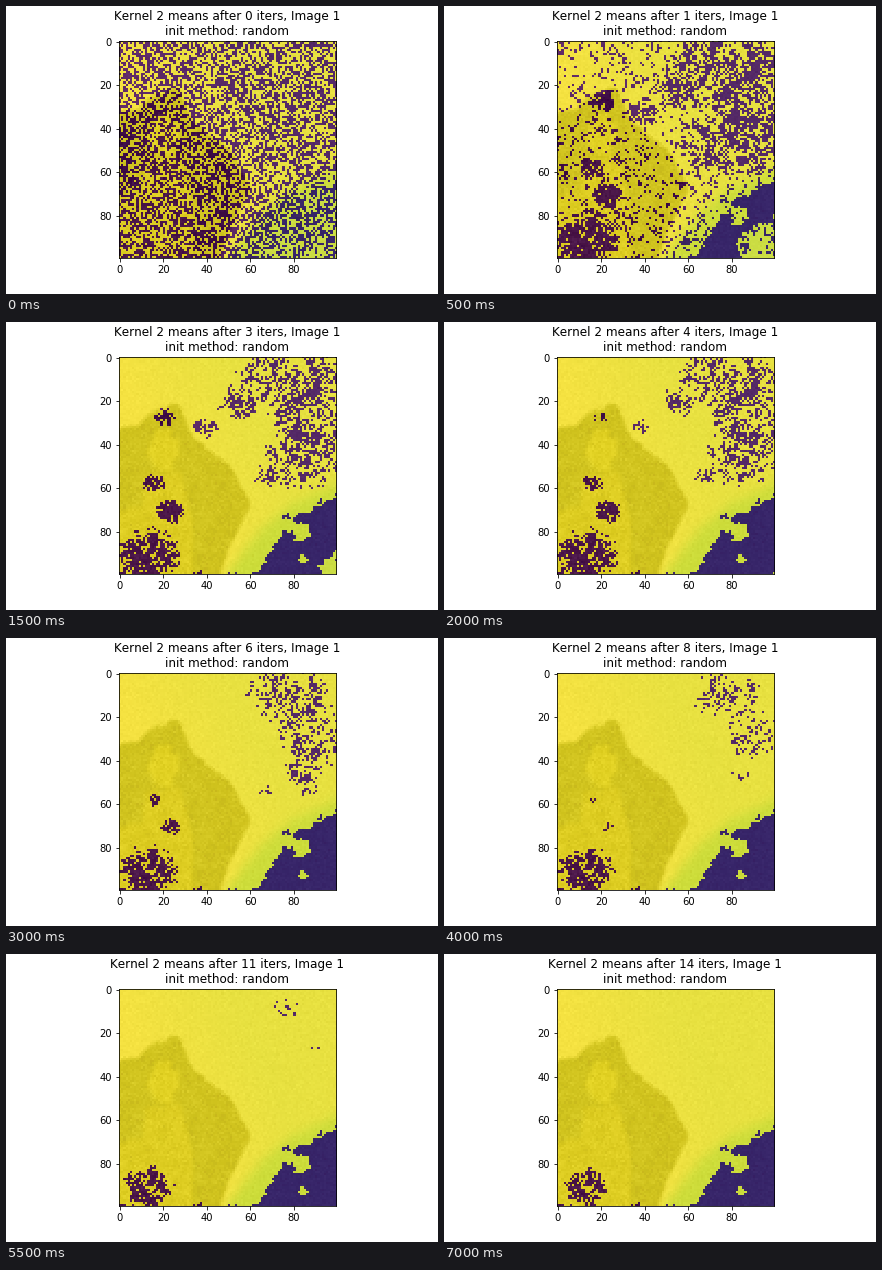
Recreate the animation shown at these times as a matplotlib script. Size 432 by 288 pixels, loop 7500 ms.

```python
import numpy as np
import matplotlib.pyplot as plt
from matplotlib.animation import FuncAnimation

N, ITERS = 100, 15
rng = np.random.default_rng(7)
yy, xx = np.mgrid[0:N, 0:N].astype(float)

# x, y, radius, iteration at which the purple patch is gone
PATCHES = [(77, 9, 26, 11.8), (91, 28, 24, 11.8), (84, 46, 20, 8.5), (55, 20, 13, 6),
           (67, 54, 8, 7), (39, 32, 8, 5), (20, 28, 7, 5), (16, 58, 6, 9),
           (23, 71, 8, 9), (13, 91, 16, 26)]


def blur(a, times):
    for _ in range(times):
        p = np.pad(a, 1, mode="edge")
        a = (p[:-2, 1:-1] + p[2:, 1:-1] + p[1:-1, :-2] + p[1:-1, 2:] + p[1:-1, 1:-1]) / 5
    return a


def noise(smooth=0):
    a = blur(rng.normal(0, 1, (N, N)), smooth)
    return a / a.std()


def below(xs, ys, rough=0.6):
    """Everything under a coast line through the given points."""
    return (yy + rough * noise(1) > np.interp(xx, xs, ys)).astype(float)


def disc(x, y, rx, ry):
    return (np.hypot((xx - x) / rx, (yy - y) / ry) + .1 * noise(1) < 1).astype(float)


def paint(img, mask, color):
    m = mask[..., None]
    return img * (1 - m) + np.array(color) * m


def make_photo():
    east = np.clip((xx - .45 * yy + 5) / 55, 0, 1)
    img = paint(np.full((N, N, 3), (214, 207, 180.)), east, (150, 203, 178))
    img = paint(img, blur(shallows, 14), (15, 178, 145))
    img = paint(img, .9 * blur(sea, 1), (5, 182, 195))
    img = paint(img, blur(forest, 1), (35, 57, 10))
    img = paint(img, .9 * blur(disc(20, 43, 7, 10), 2), (125, 130, 35))
    img = paint(img, .8 * blur(meadow, 2), (115, 115, 30))
    grain = noise() * (11 + 9 * forest) + 8 * forest * noise(4)
    return np.clip(img + grain[..., None], 0, 255).astype(np.uint8)


def density(step):
    """Chance that a pixel still belongs to the purple cluster."""
    keep = np.ones((N, N))
    for x, y, radius, end in PATCHES:
        k = np.sqrt(np.clip((end - step) / (end - 2), 0, 1))
        r = np.hypot(xx - x, 1.15 * (yy - y)) / radius
        keep *= 1 - (.46 + .32 * forest) * np.sqrt(k) * np.clip(3 * (k - r), 0, 1)
    corner = np.hypot(xx - 99, yy - 99) + 2 * clumps < 8 * (4 - step)
    return np.maximum(1 - keep, sea * ~corner)


def labels(step):
    """1 for the yellow cluster, 0 for the purple one."""
    if step == 0:
        return start
    sprinkle = .08 * max(0, 3 - step)
    d = sprinkle + (1 - sprinkle) * density(max(step, 2))
    return (chance >= d).astype(float)


forest = (below([0, 8, 12, 27, 33, 52, 60], [33, 32, 27, 21, 36, 52, 67])
          * (xx < np.interp(yy, [67, 78, 88, 100], [60, 55, 50, 46])))
meadow = below([0, 10, 12, 28, 34], [70, 68, 54, 53, 78]) * (xx < 34)
shallows = below([48, 64, 75, 100], [100, 80, 70, 57])
sea = below([62, 70, 74, 75, 88, 100], [100, 88, 82, 74, 70, 62], 1)
for x, y, r in [(83, 80, 4), (77, 77, 3), (84, 93, 2)]:
    sea *= 1 - disc(x, y, r, r)

start = (rng.random((N, N)) >= .5).astype(float)
clumps = noise(2)
# ranks of clumpy noise, spread evenly over 0..1
chance = (noise() + .6 * clumps).ravel().argsort().argsort().reshape(N, N) / N ** 2

plt.rcParams["text.kerning_factor"] = 6
fig = plt.figure(figsize=(6, 4), dpi=72, facecolor="white")
fig.subplots_adjust(left=.125, right=.9, bottom=.125, top=.88)
ax = fig.add_subplot()
ax.imshow(make_photo(), interpolation="nearest")
overlay = ax.imshow(start, cmap="viridis", vmin=0, vmax=1, alpha=.8, interpolation="nearest")
ax.set_xticks(range(0, N, 20))
ax.set_yticks(range(0, N, 20))
title = ax.set_title("", fontsize=12)


def update(step):
    overlay.set_data(labels(step))
    title.set_text(f"Kernel 2 means after {step} iters, Image 1\ninit method: random")
    return overlay, title


anim = FuncAnimation(fig, update, frames=ITERS, interval=500, repeat=True, repeat_delay=0)
plt.show()
```
